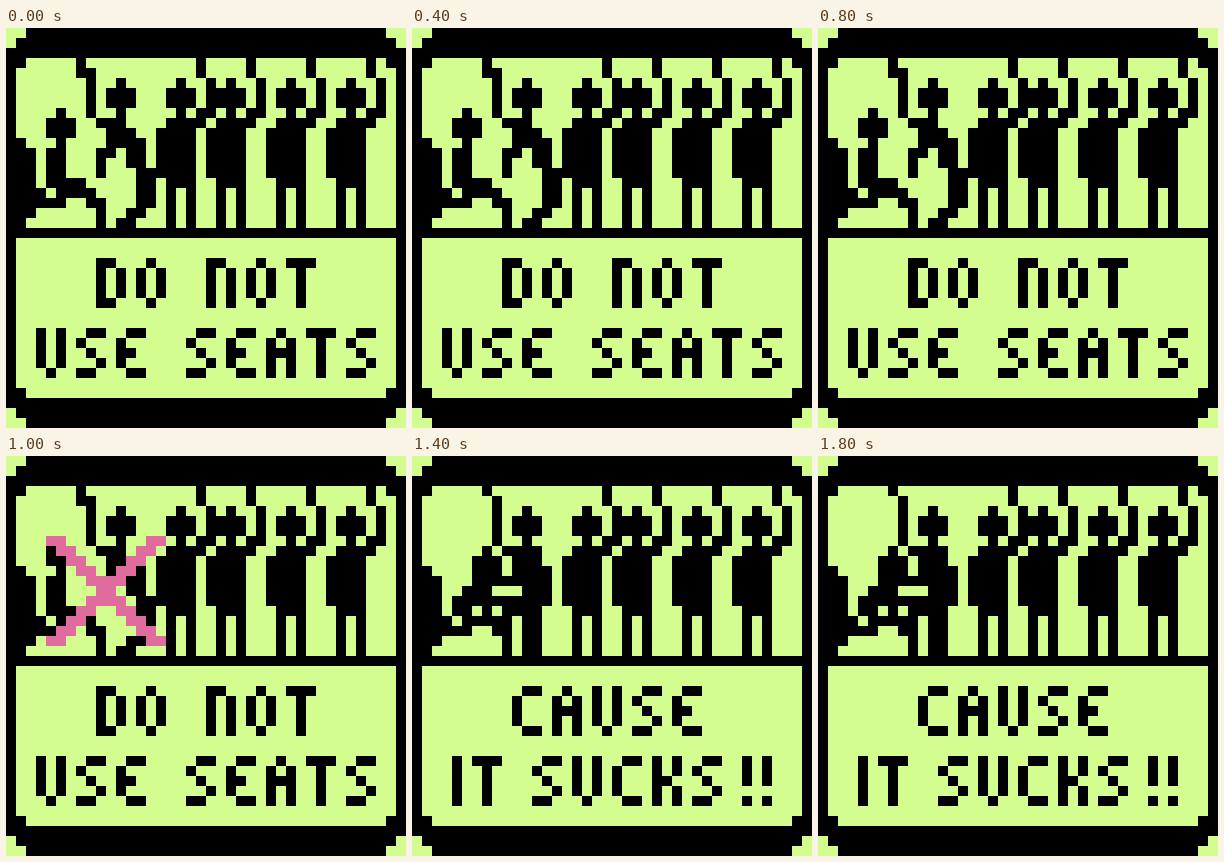
An HTML page with a canvas for the animation above (2 s loop, 400 by 400 pixels).

```html
<!DOCTYPE html>
<html lang="en">
<head>
<meta charset="utf-8">
<title>Do not use seats</title>
<style>
  html, body { margin: 0; width: 100%; height: 100%; overflow: hidden; background: #000; }
  canvas { display: block; width: 400px; height: 400px; }
</style>
</head>
<body>
<canvas id="stage" width="400" height="400"></canvas>
<script>
const ctx = document.getElementById('stage').getContext('2d');
ctx.scale(10, 10);

const LIGHT = '#d4fd8f', DARK = '#000', PINK = '#e06c9f';
const STEP = 200, LOOP = 2000;

// Pen strokes on a 3 by 5 grid; each point is written as "xy".
const STROKES = {
  A: '04 01 10 21 24,02 22',
  C: '20 10 01 03 14 24',
  D: '00 10 21 23 14 04 00',
  E: '20 10 01 03 14 24,02 12',
  I: '00 04',
  K: '00 04,20 21 12 23 24',
  N: '04 00 10 21 24',
  O: '10 01 03 14 23 21 10',
  S: '20 10 01 23 14 04',
  T: '00 20,10 14',
  U: '00 03 14 23 20',
  '!': '00 02,04 04'
};
const NARROW = 'I!';

function rect(x, y, w = 1, h = 1, color = DARK) {
  ctx.fillStyle = color;
  ctx.fillRect(x, y, w, h);
}

// Drags a flat brush, `width` cells wide, cell by cell along the points.
function trace(points, width = 1, color = DARK) {
  points.forEach(([x, y], i) => {
    const [px, py] = points[Math.max(0, i - 1)];
    const n = Math.max(Math.abs(x - px), Math.abs(y - py), 1);
    for (let k = 0; k <= n; k++)
      rect(Math.round(px + (x - px) * k / n), Math.round(py + (y - py) * k / n), width, 1, color);
  });
}

function write(text, x, y) {
  for (const letter of text) {
    for (const stroke of STROKES[letter].split(','))
      trace(stroke.split(' ').map(([dx, dy]) => [x + +dx, y + +dy]));
    x += NARROW.includes(letter) ? 2 : 4;
  }
}

function head(x, y) {
  rect(x + 1, y, 1, 4);
  rect(x, y + 1, 3, 2);
}

function frame() {
  rect(0, 0, 40, 40);
  rect(1, 3, 38, 17, LIGHT);
  rect(1, 21, 38, 16, LIGHT);
  for (const side of [0, 1]) {
    const outer = side * 39, inner = 1 + side * 37;
    for (const y of [3, 36]) rect(inner, y);
    for (const y of [0, 39]) rect(inner, y, 1, 1, LIGHT);
    for (const y of [0, 38]) rect(outer, y, 1, 2, LIGHT);
  }
}

function passenger(x) {
  head(x, 5);
  trace([[x + 3, 3], [x + 3, 4], [x + 4, 5], [x + 4, 8], [x + 3, 8], [x + 3, 9]]);
  rect(x, 9, 3, 7);
  rect(x - 1, 10, 4, 5);
  for (const leg of [x, x + 2]) rect(leg, 16, 1, 4);
}

function scenery() {
  rect(1, 11, 1, 9);
  rect(1, 12, 2, 7);
  [16, 21, 27, 33].forEach(passenger);
  head(10, 5);
  trace([[7, 3], [8, 4], [8, 8], [9, 9]]);
}

function seatedLegs() {
  trace([[3, 16], [3, 17], [5, 17]]);
  trace([[5, 16], [8, 16], [8, 17], [9, 17], [9, 19]]);
}

function sitter() {
  seatedLegs();
  head(4, 8);
  rect(7, 4);
  trace([[4, 12], [4, 15]], 2);
  trace([[4, 15], [5, 16]], 4);
}

function walker() {
  trace([[9, 9], [10, 10], [10, 11]], 3);
  trace([[10, 12], [9, 12], [9, 14]]);
  trace([[12, 11], [12, 13], [13, 14], [13, 17], [11, 19]], 2);
}

function rider() {
  seatedLegs();
  rect(9, 16);
  rect(10, 9, 3, 7);
  rect(13, 11, 1, 4);
  rect(11, 16, 2, 4);
  rect(10, 13, 1, 1, LIGHT);
}

function slumped() {
  rider();
  rect(7, 4);
  rect(9, 10, 1, 6);
  for (let y = 11; y < 15; y++) rect(20 - y, y, y - 10);
  rect(4, 15, 4);
}

function leaning() {
  rider();
  head(6, 9);
  trace([[6, 12], [4, 14]], 3);
  trace([[7, 14], [9, 14], [9, 15]]);
  for (const x of [4, 5, 7]) rect(x, 15);
  rect(9, 12);
}

function cross() {
  trace([[4, 8], [14, 18]], 2, PINK);
  trace([[14, 8], [4, 18]], 2, PINK);
}

function draw(time) {
  const step = Math.floor(time % LOOP / STEP), odd = step % 2 === 1;
  frame();
  scenery();
  if (step < 6) {
    sitter();
    walker();
    if (odd) cross();
    write('DO', 9, 23);
    write('NOT', 20, 23);
    write('USE', 3, 30);
    write('SEATS', 18, 30);
  } else {
    if (odd) leaning(); else slumped();
    write('CAUSE', 10, 23);
    write('IT', 4, 30);
    write('SUCKS', 12, 30);
    write('!!', 33, 30);
  }
}

const start = performance.now();
function tick() {
  draw(performance.now() - start);
  requestAnimationFrame(tick);
}
tick();
</script>
</body>
</html>
```
